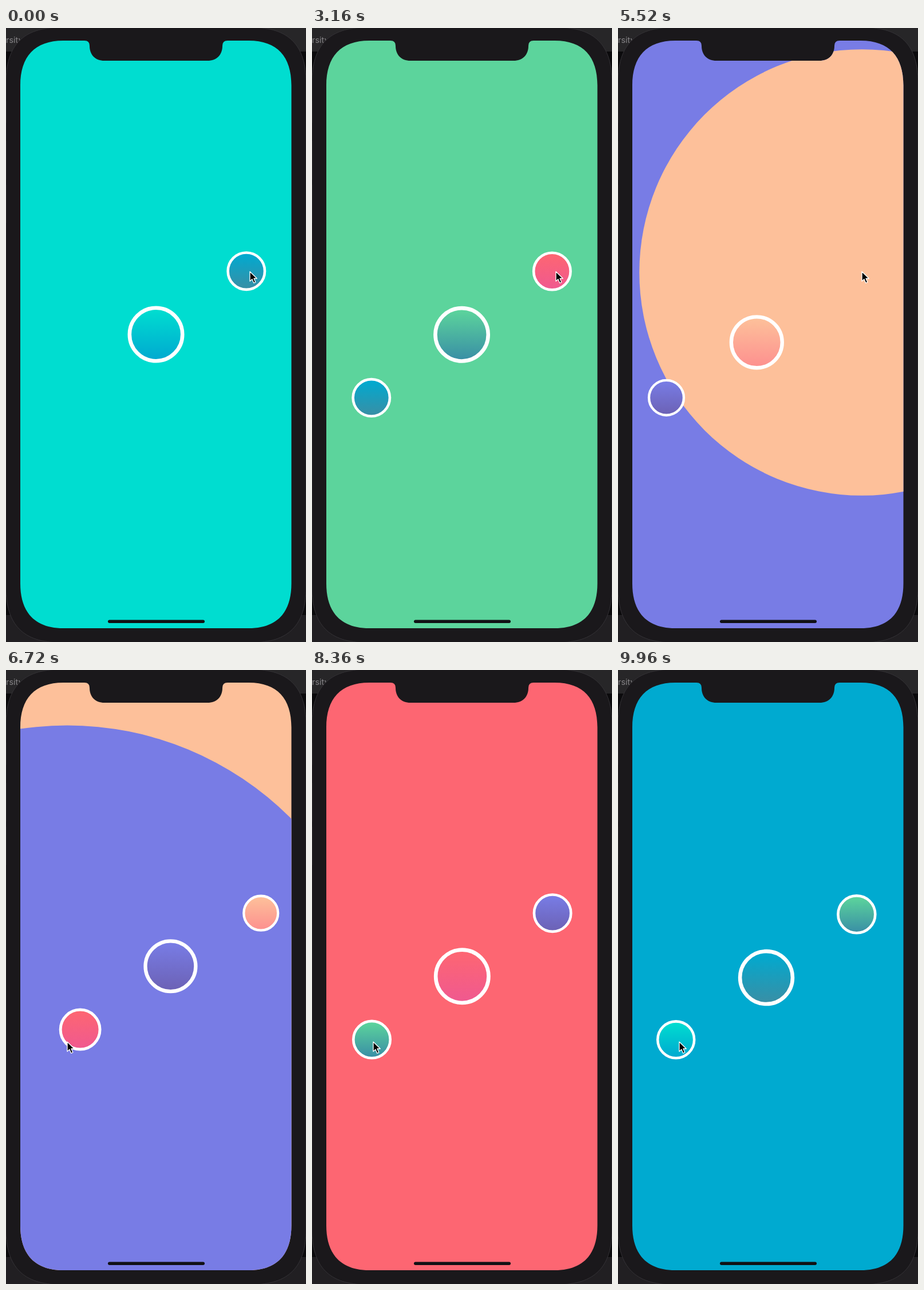
Write an HTML page that moves like this. It is 524 by 1070 pixels and loops after 10000 ms.

```html
<!DOCTYPE html>
<html lang="en">
<head>
<meta charset="utf-8">
<title>Colour carousel</title>
<style>
  html, body { margin: 0; width: 100%; height: 100%; overflow: hidden; background: #1a181b; }
  svg { display: block; width: 100%; height: 100%; }
  text { font: 14.5px Inter, Roboto, sans-serif; fill: #858386; }
</style>
</head>
<body>
<svg id="stage" viewBox="0 0 524 1070" xmlns="http://www.w3.org/2000/svg">
  <defs>
    <clipPath id="screen">
      <path d="M25 100C25 50 50 22 100 22H137Q146 22 146 31C146 47 156 57 172 57H352C368 57 378 47 378 31Q378 22 387 22H424C474 22 498.5 50 498.5 100V968C498.5 1018 474 1046 424 1046H100C50 1046 25 1018 25 968Z"/>
    </clipPath>
  </defs>

  <rect width="524" height="1070" fill="#0b0a0c"/>
  <rect width="524" height="41" fill="#272628"/>
  <rect y="1023" width="524" height="47" fill="#211f22"/>
  <text x="0" y="26">rsity</text>
  <path d="M0 95C0 30 30 -1 95 -1H429C494 -1 524 30 524 95V975C524 1040 494 1071 429 1071H95C30 1071 0 1040 0 975Z"
        fill="#1a181b" stroke="#343236"/>
  <path d="M.5 127V165M.5 197V264M.5 273V340" stroke="#2d2b2f"/>

  <g clip-path="url(#screen)">
    <rect id="back" x="24" y="21" width="476" height="1027"/>
    <circle id="ripple"/>
    <g id="balls"></g>
  </g>
  <rect x="178" y="1031.5" width="169" height="5.5" rx="2.75" fill="#111114"/>
  <path id="cursor" d="M0 0V16.8L3.9 13.2L6.7 19.8L9.8 18.5L7 12H12.3Z"
        stroke="#fff" stroke-width="1.3" stroke-linejoin="round"/>
</svg>
<script>
const LOOP = 10000;
const STEP = { x: 157.8, y: 110.3, r: 15 };
const MID = { x: 262, y: 534, r: 49.5 };
const RIGHT = [426, 426], LEFT = [107, 648.5];

// top and bottom of each ball's gradient; the top also fills the screen
const COLORS = [
  ['#00ddd0', '#00aad0'],
  ['#00aad0', '#388fa6'],
  ['#5cd49c', '#3a90a5'],
  ['#fd6672', '#f0598f'],
  ['#787ce5', '#6c62b6'],
  ['#fdc09a', '#fd918f']
];

// time, direction, delay of the ripple
const TAPS = [
  [1270, 1, 0], [2210, 1, 0], [3190, 1, 0], [4173, 1, 0], [5282, 1, 12],
  [6420, -1, 0], [7385, -1, 0], [8396, -1, 0], [9312, -1, 0]
];

const $ = id => document.getElementById(id);
const clamp = (v, a, b) => Math.min(b, Math.max(a, v));

function make(tag, attrs, parent) {
  const el = document.createElementNS('http://www.w3.org/2000/svg', tag);
  set(el, attrs);
  return parent.appendChild(el);
}

function set(el, attrs) {
  for (const k in attrs) el.setAttribute(k, attrs[k]);
}

const balls = COLORS.map(([top, bottom], i) => {
  const grad = make('linearGradient', { id: 'g' + i, x1: 0, y1: 0, x2: 0, y2: 1 }, $('balls'));
  make('stop', { offset: 0.04, 'stop-color': top }, grad);
  make('stop', { offset: 0.96, 'stop-color': bottom }, grad);
  return make('circle', { r: 46.2, fill: `url(#g${i})`, stroke: '#fff', 'stroke-width': 6.6 }, $('balls'));
});

// damped spring: response 0.5 s, damping 0.5
function spring(ms) {
  if (ms <= 0) return 0;
  const zeta = 0.5, w = 2 * Math.PI / 500, k = Math.sqrt(1 - zeta * zeta);
  const a = w * k * ms;
  return 1 - Math.exp(-zeta * w * ms) * (Math.cos(a) + zeta / k * Math.sin(a));
}

// cubic-bezier(.4, 0, .2, 1)
function ease(x) {
  if (x <= 0) return 0;
  if (x >= 1) return 1;
  let lo = 0, hi = 1, u = 0.5;
  for (let n = 0; n < 24; n++) {
    u = (lo + hi) / 2;
    const v = 1 - u;
    if (1.2 * v * v * u + 0.6 * v * u * u + u * u * u < x) lo = u; else hi = u;
  }
  return 3 * (1 - u) * u * u + u * u * u;
}

function draw(t) {
  let pos = 0, now = 0, prev = 0, radius = 0, at = RIGHT;
  for (const [start, dir, delay] of TAPS) {
    if (t < start) break;
    pos += dir * spring(t - start);
    prev = now;
    now += dir;
    radius = 740 * ease((t - start - delay) / 630);
    at = dir > 0 ? RIGHT : LEFT;
  }

  const full = radius >= 739;
  set($('back'), { fill: COLORS[full ? now : prev][0] });
  set($('ripple'), { cx: at[0], cy: at[1], r: full ? 0 : radius, fill: COLORS[now][0] });

  balls.forEach((ball, i) => {
    const d = i - pos;
    const x = MID.x + STEP.x * d;
    const y = MID.y - STEP.y * clamp(d, -1, 1);
    const scale = Math.max(0, 1 - STEP.r / MID.r * Math.abs(d));
    set(ball, { transform: `translate(${x} ${y}) scale(${scale})` });
  });

  const m = ease((t - 5680) / 560);
  set($('cursor'), { transform: `translate(${426 - 319 * m} ${424.5 + 223.5 * m})` });
}

const begin = performance.now();
function tick() {
  draw((performance.now() - begin) % LOOP);
  requestAnimationFrame(tick);
}
tick();
</script>
</body>
</html>
```
